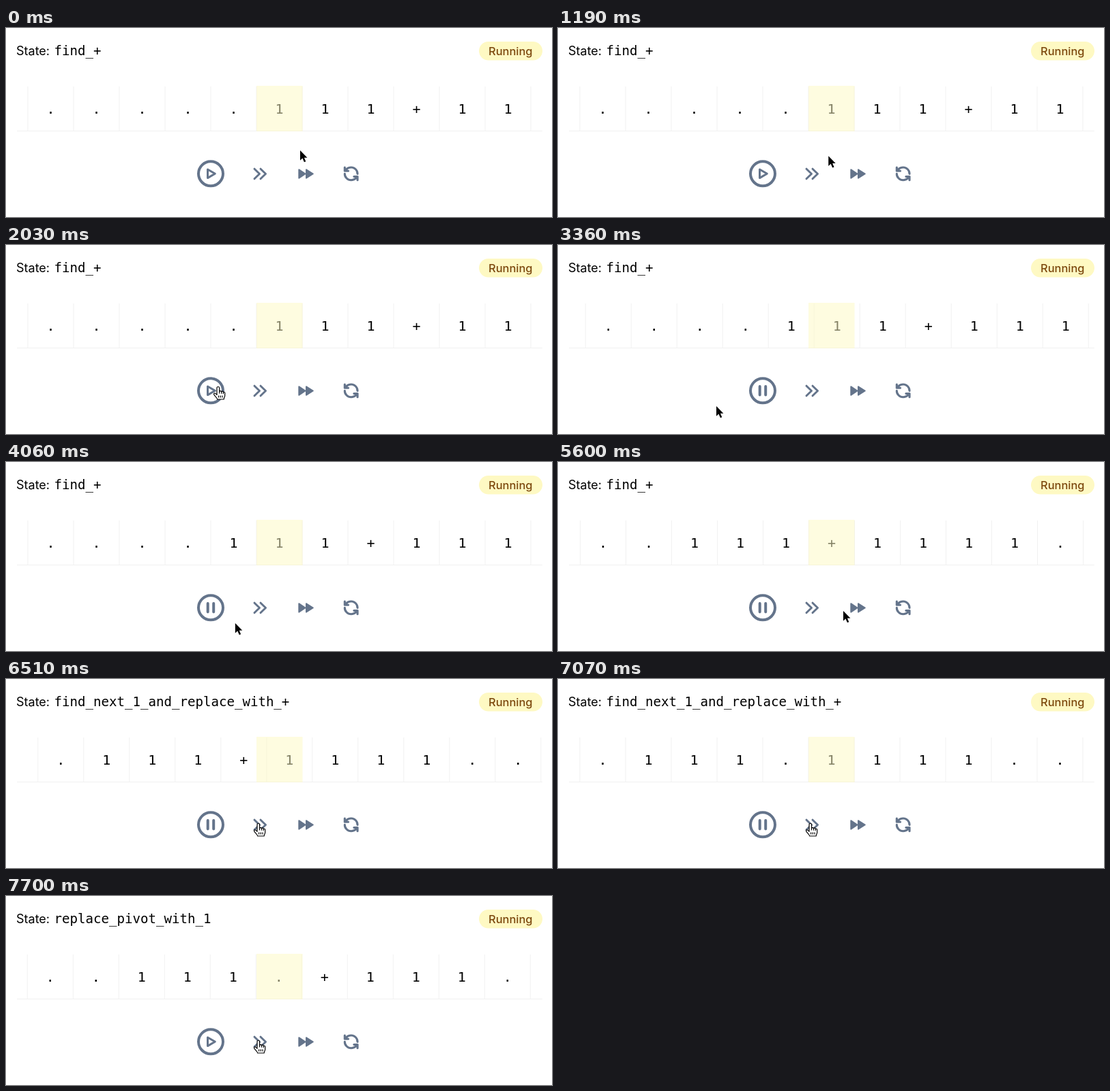
An HTML page for the animation above (8000 ms loop, 800 by 278 pixels).

```html
<!DOCTYPE html>
<html lang="en">
<head>
<meta charset="utf-8">
<title>Turing machine</title>
<style>
  html, body { margin: 0; width: 100%; height: 100%; overflow: hidden; background: #fff; }
  svg { display: block; width: 800px; height: 278px; }
  .sans { font-family: Inter, sans-serif; }
  .mono { font-family: "DejaVu Sans Mono", monospace; }
  .icon { fill: none; stroke: #64748b; stroke-width: 3; stroke-linecap: round; stroke-linejoin: round; }
  .solid { fill: #64748b; stroke-width: 2; }
</style>
</head>
<body>
<svg viewBox="0 0 800 278">
  <clipPath id="window"><rect x="16" y="80" width="770" height="76"/></clipPath>

  <text class="sans" x="15" y="40" font-size="18">State:</text>
  <text id="state" class="mono" x="70.5" y="40" font-size="19.1"></text>
  <rect x="693" y="20" width="93" height="27.5" rx="13.75" fill="#fef9c3"/>
  <text class="sans" x="739.3" y="39.5" font-size="16.4" font-weight="500" fill="#7c480d" text-anchor="middle">Running</text>

  <g clip-path="url(#window)">
    <g id="tape" class="mono" font-size="20" text-anchor="middle"></g>
    <path d="M15 151.5H786" stroke="#f1f1f1"/>
  </g>
  <rect x="367" y="85" width="67.5" height="67" fill="#fef9c3" opacity=".52"/>

  <g class="icon">
    <circle cx="300" cy="214.3" r="18" stroke-width="4"/>
    <path id="play" d="M295.5 208V220.6L306.3 214.3Z"/>
    <path id="pause" d="M295.7 208V220.6M304.2 208V220.6" stroke-width="4"/>
    <path d="M364 207.2L371.5 214.5L364 221.8M373 207.2L380.5 214.5L373 221.8"/>
    <path class="solid" d="M429.3 208.3V220.7L438.5 214.5ZM440 208.3V220.7L449.8 214.5Z"/>
    <path transform="translate(493.2 201.9) scale(1.04)" d="M21 12a9 9 0 0 0-9-9 9.75 9.75 0 0 0-6.74 2.74L3 8M3 3v5h5M3 12a9 9 0 0 0 9 9 9.75 9.75 0 0 0 6.74-2.74L21 16M16 16h5v5"/>
  </g>

  <g id="cursor" stroke-linejoin="round">
    <path id="arrow" d="M0 0V14.8L3.4 11.6L5.9 17.2L8.3 16.2L5.9 10.7H10.4Z" stroke="#fff" stroke-width="1.2" paint-order="stroke"/>
    <path id="hand" fill="#fff" stroke="#000" stroke-width="1.2" d="M-2 1.8a1.8 1.8 0 0 1 3.6 0V7a1.6 1.6 0 0 1 3 .4a1.5 1.5 0 0 1 2.8.7a1.4 1.4 0 0 1 2.3 1.2v3.7c0 2-1.5 3-1.5 5.5H-1.4c0-2-3.9-4.7-5-7.2c-.6-1.8 1.6-2.5 3-.9l1.4 1.5ZM1.6 7v3M4.6 7.6v2.6M7.4 8.2v2.2M.6 13v3M3.3 13v3M6 13v3"/>
  </g>
</svg>
<script>
const LOOP = 8000, CELL = 67, HEAD_X = 400.5, MOVE = 400, WRITE_DELAY = 300;
const FIRST = -8, LAST = 12, START_TAPE = "111+1111";
const PLAY_AT = 2060, PAUSE_AT = 7356;

const steps = [
  { at: 3120, dir: 1 },
  { at: 4183, dir: 1 },
  { at: 5246, dir: 1 },
  { at: 6310, dir: 1, cell: 3, write: ".", state: "find_next_1_and_replace_with_+" },
  { at: 7356, dir: -1, cell: 4, write: "+", state: "replace_pivot_with_1" }
];

// time, x, y of the pointer's hot spot
const pointerPath = [
  [910, 431, 180], [1700, 311, 208.5], [2200, 311, 208.5], [2520, 290, 240],
  [2660, 262, 258], [2800, 232, 244], [3120, 232, 244], [3360, 232, 237],
  [3560, 232, 237], [4500, 421, 237], [4900, 421, 237], [5550, 418, 219],
  [5670, 418, 219], [6090, 370, 212.5]
];

const $ = id => document.getElementById(id);
const clamp = v => Math.min(1, Math.max(0, v));
const show = (id, on) => $(id).style.display = on ? "" : "none";
const setText = (node, text) => { if (node.textContent !== text) node.textContent = text; };

// cubic-bezier(.4, 0, .2, 1), solved by bisection
function ease(p) {
  if (p <= 0 || p >= 1) return clamp(p);
  let lo = 0, hi = 1;
  for (let i = 0; i < 20; i++) {
    const u = (lo + hi) / 2, v = 1 - u;
    if (1.2 * u * v * v + 0.6 * u * u * v + u ** 3 < p) lo = u; else hi = u;
  }
  return lo * lo * (3 - 2 * lo);
}

function pointerAt(t) {
  const next = pointerPath.findIndex(point => point[0] > t);
  if (next === 0) return pointerPath[0].slice(1);
  if (next < 0) return pointerPath.at(-1).slice(1);
  const [t0, x0, y0] = pointerPath[next - 1], [t1, x1, y1] = pointerPath[next];
  const p = (t - t0) / (t1 - t0), s = p * p * (3 - 2 * p);
  return [x0 + (x1 - x0) * s, y0 + (y1 - y0) * s];
}

function svgNode(tag, attributes) {
  const node = document.createElementNS("http://www.w3.org/2000/svg", tag);
  for (const name in attributes) node.setAttribute(name, attributes[name]);
  return $("tape").appendChild(node);
}

const glyphs = {};
for (let i = FIRST; i <= LAST; i++) {
  svgNode("path", { d: `M${(i - 0.5) * CELL} 86V151`, stroke: "#f1f1f1" });
  glyphs[i] = svgNode("text", { x: i * CELL, y: 126 });
}

function draw(t) {
  const written = {};
  let head = 0, state = "find_+";
  for (const step of steps) {
    if (t < step.at) break;
    head += step.dir * ease((t - step.at) / MOVE);
    state = step.state || state;
    if (step.write && t >= step.at + WRITE_DELAY) written[step.cell] = step.write;
  }
  for (let i = FIRST; i <= LAST; i++) setText(glyphs[i], written[i] || START_TAPE[i] || ".");
  $("tape").setAttribute("transform", `translate(${HEAD_X - head * CELL} 0)`);
  setText($("state"), state);

  const running = t >= PLAY_AT && t < PAUSE_AT;
  show("play", !running);
  show("pause", running);

  const [x, y] = pointerAt(t);
  const overButton = Math.hypot(x - 300, y - 214) < 20 || (Math.abs(x - 372) < 12 && Math.abs(y - 214) < 12);
  show("hand", overButton);
  show("arrow", !overButton);
  $("cursor").setAttribute("transform", `translate(${x} ${y})`);
}

const start = performance.now();
function frame() {
  draw((performance.now() - start) % LOOP);
  requestAnimationFrame(frame);
}
frame();
</script>
</body>
</html>
```
